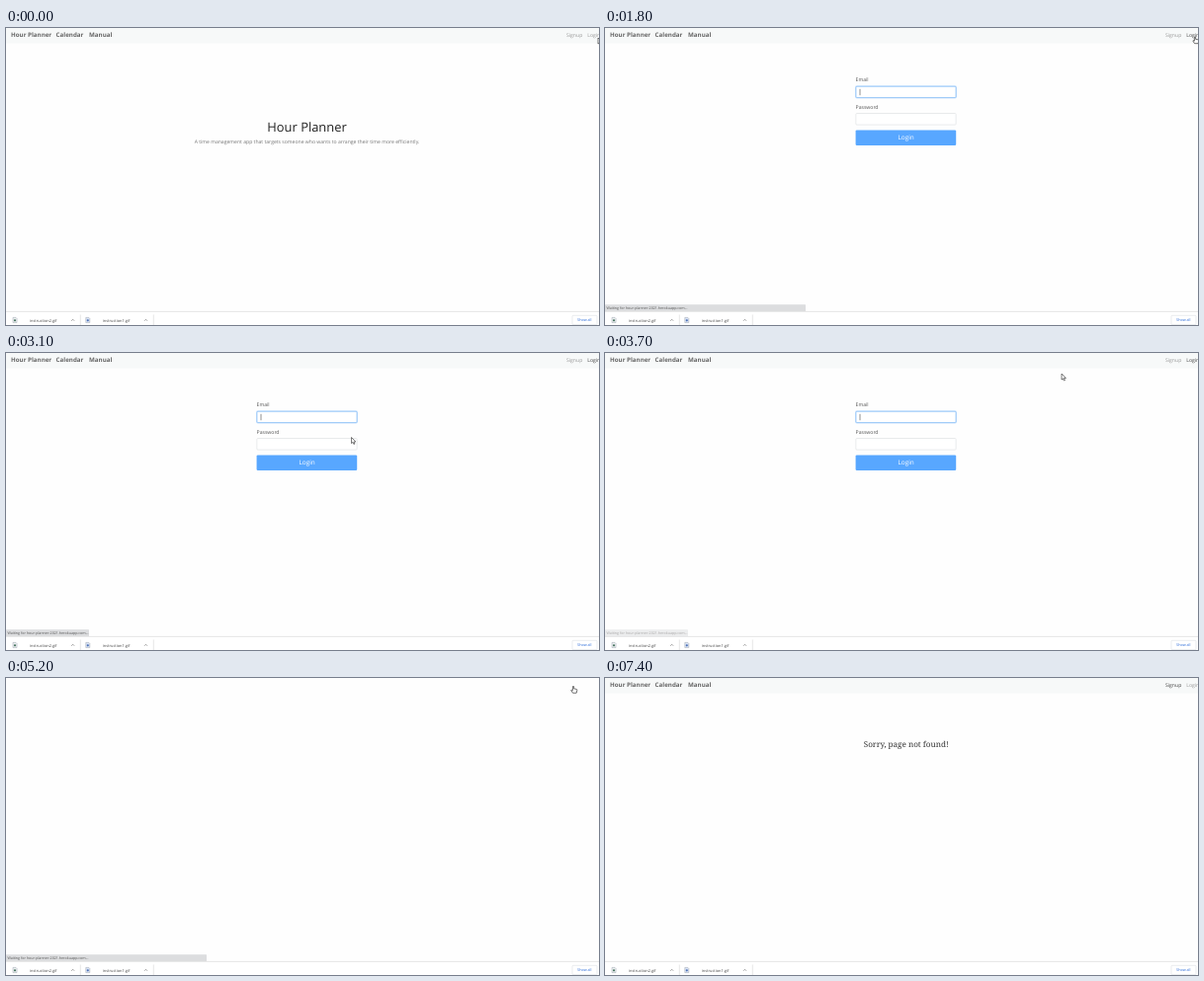
An HTML page that plays this animation: 600x301 px, repeating every 7900 ms.

```html
<!DOCTYPE html>
<html lang="en">
<head>
<meta charset="utf-8">
<title>Hour Planner</title>
<style>
html, body { margin: 0; width: 100%; height: 100%; overflow: hidden; background: #fefefe; }
svg { display: block; width: 600px; height: 301px; font: 5.1px "Open Sans", "Noto Sans", sans-serif; text-rendering: geometricPrecision; }
.mid { text-anchor: middle; }
.brand { font-weight: 700; font-size: 6.2px; fill: #666; }
.small { font-size: 3.65px; fill: #555; }
.file { font-size: 3.93px; fill: #444; }
.field { fill: #fff; stroke: #dadde0; stroke-width: .6; }
</style>
</head>
<body>
<svg viewBox="0 0 600 301">
  <g id="nav">
    <rect width="600" height="15.5" fill="#f7f9f9"/>
    <g class="brand">
      <text x="5" y="9">Hour Planner</text>
      <text x="50.6" y="9">Calendar</text>
      <text x="84" y="9">Manual</text>
    </g>
    <text id="signup" x="567" y="9">Signup</text>
    <text id="login" x="588.3" y="9">Login</text>
  </g>

  <g id="home" class="mid">
    <text x="304.5" y="105.2" font-size="12.9" font-weight="500" fill="#222">Hour Planner</text>
    <text x="304.5" y="116.5" fill="#777">A time management app that targets someone who wants to arrange their time more efficiently.</text>
  </g>

  <g id="form" fill="#555">
    <text x="253.6" y="54.4">Email</text>
    <rect x="253" y="58.3" width="103" height="13.2" rx="1.8" fill="#c9e2fd"/>
    <rect class="field" x="254" y="59.3" width="101" height="11.2" rx="1" style="stroke:#72b3f5"/>
    <path d="M258 61.8v6.4" stroke="#444" stroke-width=".6"/>
    <text x="253.6" y="81.7">Password</text>
    <rect class="field" x="253.9" y="86.5" width="101.2" height="11.6" rx="1"/>
    <rect x="253.6" y="103.4" width="101.6" height="15.6" rx="1.2" fill="#58a7ff"/>
    <text class="mid" x="304.6" y="113.4" font-size="6.4" style="fill:#fff">Login</text>
  </g>

  <text id="missing" class="mid" x="304.7" y="70" fill="#333" style="font:8.15px 'Noto Serif',serif">Sorry, page not found!</text>

  <g id="status">
    <rect id="bubble" y="280.3" height="6.9" rx=".6" fill="#dcdddf"/>
    <text id="message" class="small" x="1.4" y="285.1"></text>
  </g>

  <rect y="287" width="600" height="14" fill="#fff"/>
  <path d="M0 287.4H600M75.3 290.5V301M149.3 290.5V301" stroke="#dcdcdc" stroke-width=".7"/>
  <g id="downloads"></g>
  <rect x="573" y="291.3" width="25" height="9.4" rx="1" fill="#fff" stroke="#dcdfe4" stroke-width=".6"/>
  <text class="mid" x="585.3" y="297.4" font-size="3.75" fill="#2566d8">Show all</text>

  <g id="cursor" stroke-linejoin="round">
    <path id="arrow" d="M0 0V6.1L1.4 4.9 2.4 7 3.4 6.5 2.4 4.5H4.3Z" fill="#fff" stroke="#333" stroke-width=".65"/>
    <path id="hand" d="M-.6 .6Q0-.4.6.6V2.8L3.4 3.4Q4 3.6 3.8 4.4L3.2 7.2H-.5L-2.2 4.5Q-2.2 3.6-.6 4.6Z" fill="#fff" stroke="#333" stroke-width=".7"/>
  </g>
</svg>
<script>
const LOOP = 7900, STEP = 100;
const $ = id => document.getElementById(id);
const show = (id, on) => $(id).style.display = on ? '' : 'none';

// time, x, y of the pointer tip
const path = [
  [0, 599, 10], [600, 599, 10], [700, 597, 8.5], [2300, 597, 8.5], [2400, 578, 12],
  [2600, 408, 42], [2800, 408, 42], [3200, 330, 100], [3600, 402, 46], [3700, 462, 21],
  [3900, 548, 14], [4200, 548, 14], [4300, 574, 8], [5300, 574, 8], [5600, 370, 52],
  [5700, 370, 52], [6100, 302.5, 83.3], [6500, 335, 74], [6800, 437, 27],
  [7000, 437, 27], [7400, 487, -9], [LOOP, 487, -9]
];

const host = 'hour-planner-2021.herokuapp.com';
const link = `https://${host}/login`, signupLink = `https://${host}/signup`;
const waiting = `Waiting for ${host}...`;
// start time, message, bubble width, opacity
const messages = [
  [0, '', 0, 0], [900, link, 84, .5], [1000, link, 84, 1],
  [1100, 'Establishing secure connection...', 203, 1], [1400, waiting, 203, 1],
  [1900, link, 84, 1], [2900, waiting, 84, 1], [3700, waiting, 84, .5], [3900, '', 0, 0],
  [4400, signupLink, 84, .5], [4500, signupLink, 84, 1], [4700, waiting, 203, 1],
  [6100, waiting, 203, .5], [6200, waiting, 203, .2], [6300, '', 0, 0]
];

$('downloads').innerHTML = [2, 1].map((n, i) => `<g transform="translate(${i * 73.8})">
  <path d="M7 293.4h3l1 1v4.2h-4z" fill="${i ? '#dbe5f7' : '#eef1f2'}" stroke="#9aa3ad" stroke-width=".5"/>
  <circle cx="9" cy="296.3" r="1.1" fill="${i ? '#4a6fb5' : '#44705c'}"/>
  <text class="file" x="24" y="297.6">instruction${n}.gif</text>
  <path d="M66.2 296.8l1.5-1.5 1.5 1.5" fill="none" stroke="#666" stroke-width=".6"/></g>`).join('');

function pointer(t) {
  const i = path.findIndex(p => p[0] > t);
  const [t0, x0, y0] = path[i - 1], [t1, x1, y1] = path[i];
  const k = (t - t0) / (t1 - t0);
  return [x0 + (x1 - x0) * k, y0 + (y1 - y0) * k];
}

function draw(now) {
  const t = Math.floor(now % LOOP / STEP) * STEP;
  const blank = t >= 5200 && t < 5300;
  show('nav', !blank);
  show('home', t < 1800);
  show('form', t >= 1800 && t < 5200);
  show('missing', t >= 5300);
  $('login').setAttribute('fill', t >= 700 && t < 5200 ? '#444' : '#999');
  $('signup').setAttribute('fill', t >= 4300 ? '#444' : '#999');

  const [, text, width, opacity] = messages.findLast(m => m[0] <= t);
  $('message').textContent = text;
  $('bubble').setAttribute('width', width);
  $('status').setAttribute('opacity', opacity);

  const [x, y] = pointer(t);
  const overLink = t >= 700 && x > 560;
  $('cursor').setAttribute('transform', `translate(${x} ${y})`);
  show('hand', overLink);
  show('arrow', !overLink);
  requestAnimationFrame(() => draw(performance.now()));
}
draw(performance.now());
</script>
</body>
</html>
```
